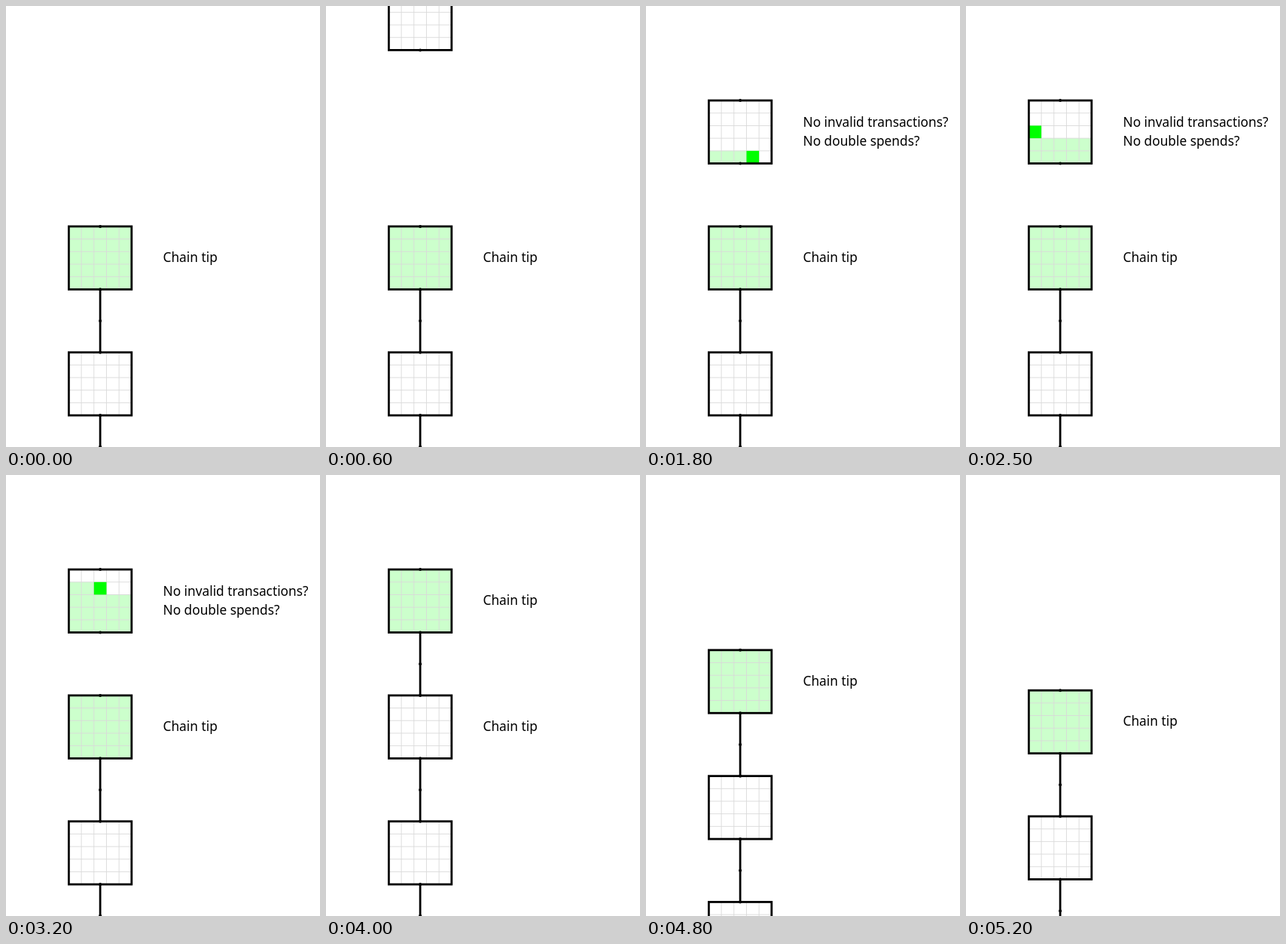
Animation, 417 px wide and 584 px high, one loop 5.3 s. Source, as an HTML page with a canvas:

```html
<!DOCTYPE html>
<html lang="en">
<head>
<meta charset="utf-8">
<title>Chain tip</title>
<style>
  html, body { margin: 0; width: 100%; height: 100%; overflow: hidden; background: #fff; }
  canvas { display: block; }
</style>
</head>
<body>
<canvas id="stage" width="417" height="584"></canvas>
<script>
const ctx = document.getElementById('stage').getContext('2d');
const U = 83.4;          // block side; all y positions are in this unit
const CELL = U / 5;
const MID = 1.5 * U;
const LINE = U / 30;
const LOOP = 5300, STEP = 100;
const ENTER = 3, LAND = 15, LINK = 40;   // in steps
const LIGHT = '#ccffcc', BRIGHT = '#00ff00';

function dot(y) {
  ctx.fillStyle = '#000';
  ctx.beginPath();
  ctx.arc(MID, y * U, 2, 0, 7);
  ctx.fill();
}

// Cells count from the bottom left, row by row.
function cell(y, i, color) {
  ctx.fillStyle = color;
  ctx.fillRect(U + (i % 5) * CELL, (y + 1) * U - (Math.floor(i / 5) + 1) * CELL, CELL, CELL);
}

function grid(top) {
  ctx.strokeStyle = '#dadada';
  ctx.lineWidth = 0.9;
  ctx.beginPath();
  for (let i = 1; i < 5; i++) {
    const d = i * CELL;
    ctx.moveTo(U + d, top);
    ctx.lineTo(U + d, top + U);
    ctx.moveTo(U, top + d);
    ctx.lineTo(2 * U, top + d);
  }
  ctx.stroke();
}

function block(y, { full = false, checking = -1 } = {}) {
  const top = y * U;
  if (full) {
    ctx.fillStyle = LIGHT;
    ctx.fillRect(U, top, U, U);
  }
  for (let i = 0; i < checking; i++) cell(y, i, LIGHT);
  grid(top);
  if (checking >= 0) cell(y, checking, BRIGHT);
  ctx.strokeStyle = '#000';
  ctx.lineWidth = LINE;
  ctx.strokeRect(U, top, U, U);
  dot(y);
  dot(y + 1);
}

function link(y) {
  ctx.strokeStyle = '#000';
  ctx.lineWidth = LINE;
  ctx.beginPath();
  ctx.moveTo(MID, (y + 1) * U);
  ctx.lineTo(MID, (y + 2) * U);
  ctx.stroke();
  dot(y + 1.5);
}

function label(text, y, dy = 0) {
  ctx.fillStyle = '#000';
  ctx.font = '17.3px "Noto Sans", "Open Sans", sans-serif';
  ctx.fillText(text, 2.5 * U, (y + 0.5) * U + 5.4 + dy);
}

function chain(tip) {
  for (let y = tip; y < 7; y += 2) {
    block(y, { full: y === tip });
    link(y);
  }
  label('Chain tip', tip);
}

function draw(n) {
  ctx.clearRect(0, 0, 417, 584);
  if (n >= LINK) {
    chain(1.5 + 0.16 * (n - LINK));
    if (n === LINK) label('Chain tip', 3.5);
    return;
  }
  chain(3.5);
  if (n >= LAND) {
    block(1.5, { checking: n - LAND });
    label('No invalid transactions?', 1.5, -12.5);
    label('No double spends?', 1.5, 12.5);
  } else if (n >= ENTER) {
    block(1.5 - 0.2 * (LAND - n));
  }
}

function tick() {
  draw(Math.floor((performance.now() % LOOP) / STEP));
  requestAnimationFrame(tick);
}
tick();
</script>
</body>
</html>
```
